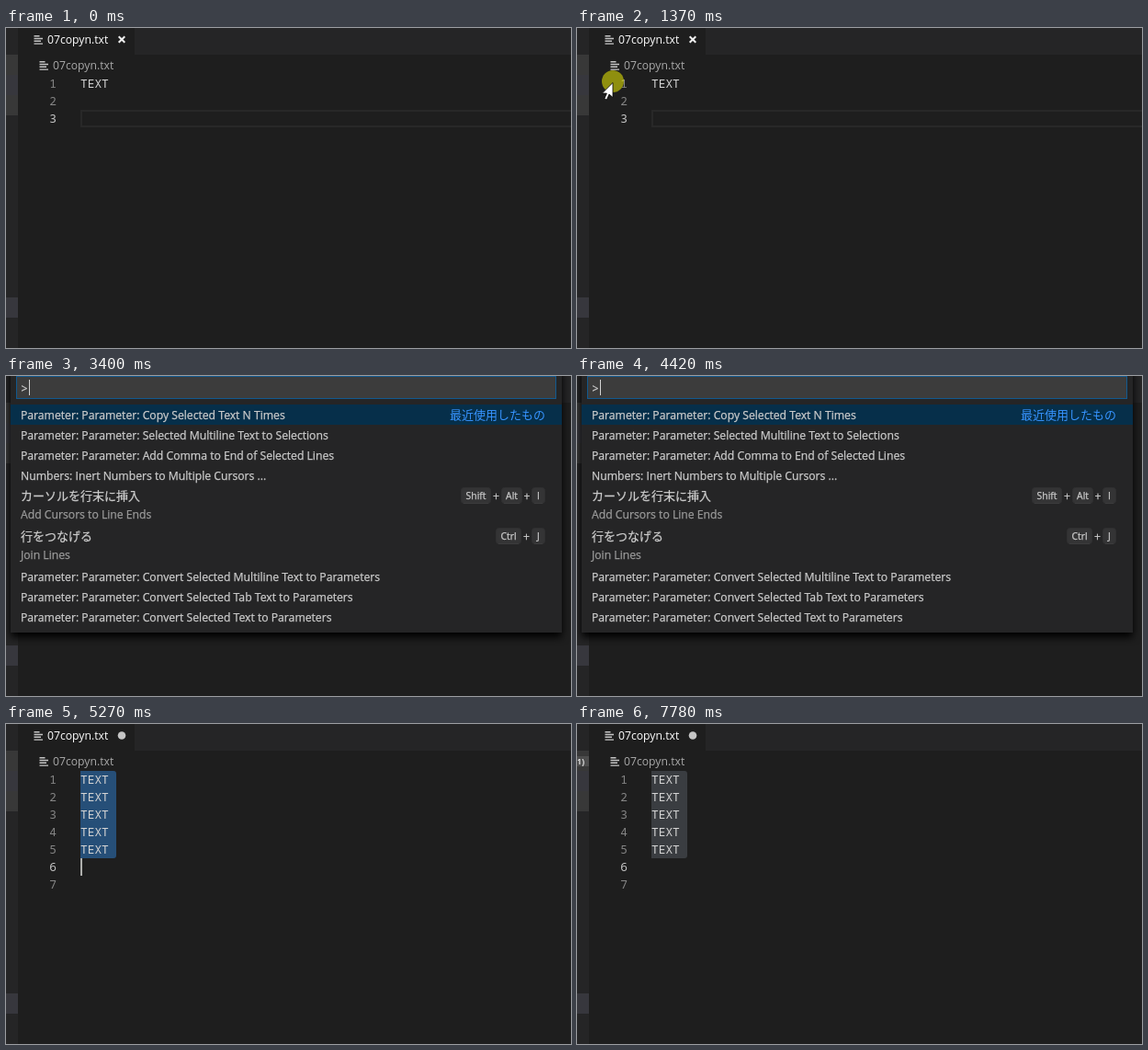
Recreate the animation shown at these times as an HTML page. Size 615 px wide and 348 px high, loop 7850 ms.

```html
<!DOCTYPE html>
<html lang="ja">
<head>
<meta charset="utf-8">
<title>Copy selected text</title>
<style>
html, body { margin: 0; width: 100%; height: 100%; overflow: hidden; background: #1e1e1e; }
svg { display: block; }
text { font: 12.2px "Open Sans", "Noto Sans CJK JP", "Noto Sans CJK", sans-serif; fill: #ccc; white-space: pre; }
.list text, .prompt { stroke: #ccc; stroke-width: .25px; }
.prompt { letter-spacing: .08px; }
.ja { font: 13px "Noto Sans CJK JP", "Noto Sans CJK", sans-serif; }
.code { font: 12.83px "Noto Sans Mono", monospace; fill: #d4d4d4; }
.num { font: 12.83px "Noto Sans Mono", monospace; fill: #858585; text-anchor: end; }
.num.active { fill: #c6c6c6; }
.list .dim { fill: #9a9a9a; stroke: #9a9a9a; }
.list .recent { fill: #3794ff; stroke: none; text-anchor: end; }
.key { font-size: 10.4px; text-anchor: middle; }
.panel { fill: #252526; filter: drop-shadow(0 5px 4px #000); }
.input { fill: #3c3c3c; stroke: #12598f; }
.caret { fill: #aeafad; }
.icon { fill: none; stroke: #c5c5c5; stroke-width: 1.4; }
</style>
</head>
<body>
<svg width="615" height="348" viewBox="0 0 615 348">
  <defs>
    <path id="fileIcon" class="icon" d="M0 .7h6M0 3.5h9.5M0 6.3h7.5M0 9.1h9.5"/>
    <path id="arrow" d="M0 0V16L4 12.5L6.6 18.6L9.2 17.5L6.6 11.6H11.6Z" fill="#fff" stroke="#000" stroke-width=".8"/>
    <path id="beam" d="M-3 -8H-1L0 -7L1 -8H3M-3 8H-1L0 7L1 8H3M0 -7V7" fill="none" stroke="#fff"/>
  </defs>

  <rect width="615" height="348" fill="#1e1e1e"/>
  <rect width="615" height="29" fill="#252526"/>
  <rect x="13" width="127" height="29" fill="#1e1e1e"/>
  <rect width="13" height="348" fill="#252526"/>
  <rect y="29" width="13" height="66" fill="#383838"/>
  <rect y="51" width="13" height="22" fill="#37373d"/>
  <rect y="293" width="13" height="22" fill="#37373d"/>
  <g data-on="5510-7850">
    <rect y="35" width="13" height="11" fill="#4d4d4d"/>
    <text x="0" y="44" style="font-size:9px;font-weight:600;fill:#fff">1)</text>
  </g>

  <use href="#fileIcon" x="30.5" y="8"/>
  <text x="45" y="17" style="fill:#fff">07copyn.txt</text>
  <path data-on="0-5270" d="M122.7 9.2l6.6 6.6m0 -6.6l-6.6 6.6" stroke="#f0f0f0" stroke-width="2"/>
  <circle data-on="5270-7850" cx="126" cy="12.5" r="4.3" fill="#c5c5c5"/>
  <use href="#fileIcon" x="36.5" y="36"/>
  <text x="51" y="45" style="fill:#a9a9a9">07copyn.txt</text>

  <rect data-on="0-1460" x="82" y="90" width="540" height="17" fill="none" stroke="#282828" stroke-width="2"/>
  <path id="selection" data-on="1460-7850"/>
  <g id="lines"></g>
  <rect id="caret" class="caret" x="81" width="2" height="19" data-on="290-840 1460-1930 2390-2940 5270-5740 6200-6750 7210-7780"/>

  <g id="palette" class="list" data-on="3400-4650">
    <rect class="panel" x="5" y="-10" width="600" height="289"/>
    <rect class="input" x="11.5" y=".5" width="587" height="24"/>
    <text x="16.5" y="18">&gt;</text>
    <rect data-on="3400-3870 4420-4650" x="25" y="4" width="1" height="17" fill="#d4d4d4"/>
    <rect x="5" y="31" width="600" height="22" fill="#062f4a"/>
    <text class="ja recent" x="587" y="47">最近使用したもの</text>
  </g>

  <g data-on="4650-5270">
    <rect class="panel" x="5" y="-10" width="600" height="67"/>
    <rect class="input" x="11.5" y=".5" width="587" height="26"/>
    <rect data-on="4720-5190" x="17" y="4" width="1" height="17" fill="#d4d4d4"/>
    <text class="prompt" x="16" y="45">N times (Default: configurated value) ('Enter' <tspan class="ja">を押して確認するか</tspan> 'Escape' <tspan class="ja">を押して取り消します</tspan>)</text>
  </g>

  <circle data-on="1370-1540" cx="39" cy="58" r="12" fill="#ff0" fill-opacity=".5"/>
  <g id="pointer">
    <use href="#beam"/>
    <use href="#arrow"/>
    <use href="#arrow" transform="scale(-1 1)"/>
  </g>
</svg>
<script>
const LOOP = 7850, SELECT = 1460, COPY = 5270, ROW = 19;
const $ = id => document.getElementById(id);

function add(parent, tag, attrs, label) {
  const el = document.createElementNS("http://www.w3.org/2000/svg", tag);
  for (const k in attrs) el.setAttribute(k, attrs[k]);
  if (label) el.textContent = label;
  return parent.appendChild(el);
}
const show = (el, on) => { el.style.display = on ? "" : "none"; };

// Editor lines
const numbers = [];
for (let i = 0; i < 7; i++) {
  const y = 65 + i * ROW;
  numbers.push(add($("lines"), "text", { class: "num", x: 55, y, "data-on": (i < 3 ? 0 : COPY) + "-" + LOOP }, i + 1));
  if (i < 5) add($("lines"), "text", { class: "code", x: 81, y, "data-on": (i ? COPY : 0) + "-" + LOOP }, "TEXT");
}

// Command list
const prefix = "Parameter: Parameter: ";
const commands = [
  [47, prefix + "Copy Selected Text N Times"],
  [69, prefix + "Selected Multiline Text to Selections"],
  [91, prefix + "Add Comma to End of Selected Lines"],
  [113, "Numbers: Inert Numbers to Multiple Cursors ..."],
  [135, "カーソルを行末に挿入", "ja"],
  [155, "Add Cursors to Line Ends", "dim"],
  [179, "行をつなげる", "ja"],
  [199, "Join Lines", "dim"],
  [223, prefix + "Convert Selected Multiline Text to Parameters"],
  [245, prefix + "Convert Selected Tab Text to Parameters"],
  [267, prefix + "Convert Selected Text to Parameters"]
];
for (const [y, label, kind = ""] of commands) add($("palette"), "text", { x: 16, y, class: kind }, label);

function keycap(x, y, w, label) {
  add($("palette"), "rect", { x: x + .5, y: y + .5, width: w - 1, height: 17, rx: 3, fill: "#343435", stroke: "#303031" });
  add($("palette"), "path", { d: `M${x + 3} ${y + 17.5}h${w - 6}`, stroke: "#3b3b3c" });
  add($("palette"), "text", { x: x + w / 2, y: y + 12.5, class: "key" }, label);
}
function plus(x, y) {
  add($("palette"), "text", { x, y, style: "text-anchor:middle" }, "+");
}
keycap(495, 121, 33, "Shift");
plus(533.5, 135);
keycap(539, 121, 23, "Alt");
plus(567, 135);
keycap(572, 121, 15, "I");
keycap(533, 165, 28, "Ctrl");
plus(566.5, 179);
keycap(572, 165, 15, "J");

// Pointer stops: time, x, y
const stops = [
  [210, 390, 249], [290, 332, 203], [370, 244, 143], [450, 160, 95], [520, 98, 62],
  [600, 58, 37], [680, 44, 44], [760, 39, 57], [840, 39, 65], [1160, 39, 59.5],
  [1780, 70, 118], [1860, 131, 223]
];
const [beam, arrow, flipped] = $("pointer").children;

function movePointer(t) {
  const stop = stops.filter(s => s[0] <= t).pop();
  show($("pointer"), stop && t < 1930);
  if (!stop) return;
  const [, x, y] = stop;
  $("pointer").setAttribute("transform", `translate(${x} ${y})`);
  show(beam, x > 66 && y > 50);
  show(arrow, y <= 50);
  show(flipped, x <= 66 && y > 50);
}

function drawSelection(t) {
  const h = t < COPY ? ROW : 5 * ROW;
  const focused = t < 3400 || (t >= COPY && t < 7780);
  $("selection").setAttribute("d", `M81 51h36q3 0 3 3v${h - 6}q0 3 -3 3h-36z`);
  $("selection").setAttribute("fill", focused ? "#264f78" : "#3a3d41");
}

const timed = [...document.querySelectorAll("[data-on]")].map(el => ({
  el, spans: el.dataset.on.split(" ").map(s => s.split("-").map(Number))
}));

function draw(t) {
  for (const { el, spans } of timed) show(el, spans.some(([a, b]) => t >= a && t < b));
  const current = t < SELECT ? 2 : t < COPY ? 1 : 5;
  numbers.forEach((n, i) => n.classList.toggle("active", i === current));
  $("caret").setAttribute("y", 51 + current * ROW);
  drawSelection(t);
  movePointer(t);
}

const start = performance.now();
function tick() {
  draw((performance.now() - start) % LOOP);
  requestAnimationFrame(tick);
}
tick();
</script>
</body>
</html>
```
